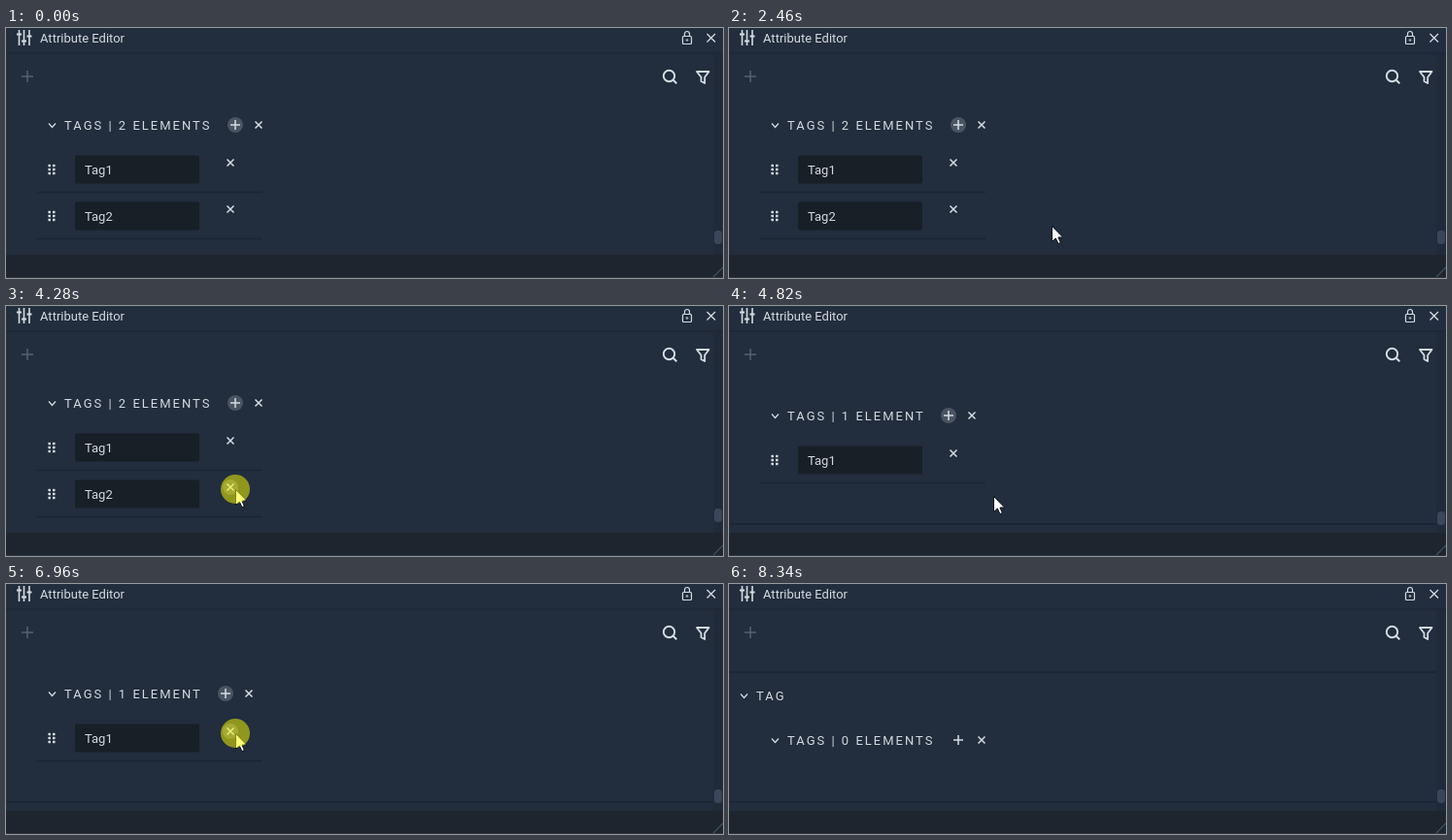
Animation of 738x258 px, one loop 8730 ms. Source, as an HTML page:

```html
<!DOCTYPE html>
<html lang="en">
<head>
<meta charset="utf-8">
<title>Attribute Editor</title>
<style>
  html, body { margin: 0; width: 100%; height: 100%; overflow: hidden; background: #222d3d; }
  svg { display: block; width: 738px; height: 258px; }
  text { font: 13px Roboto, "Open Sans", sans-serif; fill: #d3d9df; white-space: pre; }
  .caps { letter-spacing: 2px; }
  .icon { fill: none; stroke: #d5dce3; stroke-width: 1.5; }
  .rule { stroke: #1b2431; stroke-width: 1.5; }
  .disc { fill: #4a5462; }
</style>
</head>
<body>
<svg viewBox="0 0 738 258">
  <rect width="738" height="258" fill="#222d3d"/>
  <path class="rule" d="M0 26H738" opacity=".7"/>
  <rect x="728" y="27" width="10" height="207" fill="#202a39"/>

  <g class="icon">
    <path d="M13.5 2V18M18.5 2V18M24 2V18" stroke-width="1.6"/>
    <path d="M11 6.5H16M16 13.5H21M21.5 8.5H26.5" stroke-width="2"/>
    <path d="M721.5 6L730 14.5M730 6L721.5 14.5" stroke-width="1.3"/>
    <rect x="696.5" y="8.5" width="9" height="8" rx="1" stroke-width="1.2"/>
    <path d="M698.5 8.5V6A2.5 2.5 0 0 1 703.5 6V8.5" stroke-width="1.2"/>
    <circle cx="701" cy="12.5" r=".8" stroke-width="1"/>
    <path d="M16 50H28M22 44V56" stroke="#566170"/>
    <circle cx="682.5" cy="49.5" r="5.7" stroke-width="1.9"/>
    <path d="M686.5 53.5L690.3 57.3" stroke-width="2"/>
    <path d="M711 45H723.5L719.2 50.8V57L715.5 55V50.8Z" stroke-width="1.8" stroke-linejoin="round"/>
  </g>
  <text x="35" y="15">Attribute Editor</text>

  <g id="scenes"></g>
  <circle id="hover" class="disc" r="8"/>
  <g id="hoverIcon" class="icon"></g>

  <rect id="thumb" x="729" width="8" height="14" rx="3.5" fill="#3a475b"/>
  <rect y="234" width="738" height="24" fill="#1f252f"/>
  <path d="M0 257.5H738" stroke="#2b3541"/>
  <path d="M728 257L738 247" stroke="#3c5560" stroke-width="1.2"/>

  <path id="cursor" d="M.5 .5V16.5L4.3 13L6.9 18.6L9.3 17.5L6.9 12H11.6Z" fill="#fff" stroke="#10151c"/>
  <circle id="click" r="15" fill="#ff0" opacity=".5"/>
</svg>
<script>
const LOOP = 8730;
const SHOW = 760, HIDE = 8340;
const CLICKS = [4280, 6960], PRESS = 70;
const $ = id => document.getElementById(id);

// icon pieces
const cross = (x, y) => `<path class="icon" d="M${x - 3.5} ${y - 3.5}l7 7m0 -7l-7 7"/>`;
const plus = (x, y) => `<path class="icon" d="M${x - 5} ${y}h10m-5 -5v10"/>`;
const chevron = (x, y) => `<path class="icon" stroke-width="1.2" style="stroke-width:1.2" d="M${x - 3.5} ${y - 2}l3.5 4l3.5 -4"/>`;
const rule = (x1, x2, y) => `<path class="rule" d="M${x1} ${y}H${x2}"/>`;
const caps = (x, y, s) => `<text class="caps" x="${x}" y="${y + 5}">${s}</text>`;

function grip(y) {
  let s = '';
  for (const x of [43.5, 48])
    for (const dy of [-4, 0, 4])
      s += `<rect x="${x}" y="${y + dy - 1.25}" width="2.5" height="2.5" rx=".6" fill="#d5dce3"/>`;
  return s;
}

function row(y, label) {
  return grip(y) +
    `<rect x="71" y="${y - 14.5}" width="128" height="29" rx="1.5" fill="#191f27"/>` +
    `<text x="81" y="${y + 5}">${label}</text>` +
    cross(231, y - 7) + rule(32, 264, y + 23.5);
}

function header(y, title, px, disc) {
  return chevron(47.5, y + .5) + caps(60, y, title) +
    (disc ? `<circle class="disc" cx="${px}" cy="${y}" r="8"/>` : '') +
    plus(px, y) + cross(px + 24, y);
}

// each scene: start time, markup, scrollbar top, hoverable buttons
const scenes = [
  { at: 0, thumb: 209, spots: [[231, 139, cross], [231, 187, cross]],
    html: header(100, 'TAGS | 2 ELEMENTS', 236, true) + row(146, 'Tag1') + row(194, 'Tag2') },
  { at: CLICKS[0] + PRESS, thumb: 212, spots: [[231, 152, cross]],
    html: header(113, 'TAGS | 1 ELEMENT', 226, true) + row(159, 'Tag1') + rule(0, 728, 225) },
  { at: CLICKS[1] + PRESS, thumb: 212, spots: [[236, 161, plus]], hoverFrom: 7100,
    html: rule(0, 728, 91) + chevron(15.5, 115.5) + caps(28, 115, 'TAG') +
      header(161, 'TAGS | 0 ELEMENTS', 236, false) + rule(0, 728, 225) }
];

const linear = u => u;
const easeIn = u => u * u;
const easeOut = u => u * (2 - u);
const smooth = u => u * u * (3 - 2 * u);

// pointer moves: first step, last step, step count, destination, easing
const START = [697, 268];
const moves = [
  [760, 900, 3, 644, 214, easeOut],
  [1230, 1430, 4, 654, 212, smooth],
  [1630, 1770, 3, 594, 204, easeIn],
  [1840, 2460, 10, 332, 204, linear],
  [2530, 3000, 8, 236, 189, easeOut],
  [4680, 4820, 3, 272, 196, smooth],
  [5630, 6100, 8, 243, 160, smooth],
  [6170, 6360, 4, 236, 154, easeOut],
  [7380, 7520, 3, 258, 163, easeIn],
  [7590, 8200, 10, 686, 244, smooth],
  [8270, 8270, 1, 690, 253, linear]
];

function pointer(t) {
  let [x, y] = START;
  for (const [a, b, n, tx, ty, ease] of moves) {
    if (t < a) break;
    const step = Math.min(n, Math.floor((t - a) / (b - a || 1) * (n - 1) + 1 + 1e-6));
    const u = ease(step / n);
    x += (tx - x) * u;
    y += (ty - y) * u;
  }
  return [Math.round(x), Math.round(y)];
}

const show = (el, on) => el.setAttribute('visibility', on ? 'visible' : 'hidden');
const move = (el, x, y) => el.setAttribute('transform', `translate(${x} ${y})`);

let current = null, hovered = null;

function draw(t) {
  const scene = scenes.filter(s => t >= s.at).pop();
  if (scene !== current) {
    $('scenes').innerHTML = scene.html;
    $('thumb').setAttribute('y', scene.thumb);
    current = scene;
  }

  const [x, y] = pointer(t);
  const visible = t >= SHOW && t < HIDE;
  move($('cursor'), x, y);
  show($('cursor'), visible);

  const ready = visible && t >= (scene.hoverFrom || 0);
  const spot = ready && scene.spots.find(([sx, sy]) => Math.hypot(sx - x, sy - y) < 8) || null;
  if (spot !== hovered) {
    $('hoverIcon').innerHTML = spot ? spot[2](spot[0], spot[1]) : '';
    if (spot) move($('hover'), spot[0], spot[1]);
    hovered = spot;
  }
  show($('hover'), spot);

  move($('click'), x, y);
  show($('click'), CLICKS.some(c => t >= c && t < c + PRESS));
}

const began = performance.now();
function tick() {
  draw((performance.now() - began) % LOOP);
  requestAnimationFrame(tick);
}
draw(0);
requestAnimationFrame(tick);
</script>
</body>
</html>
```
